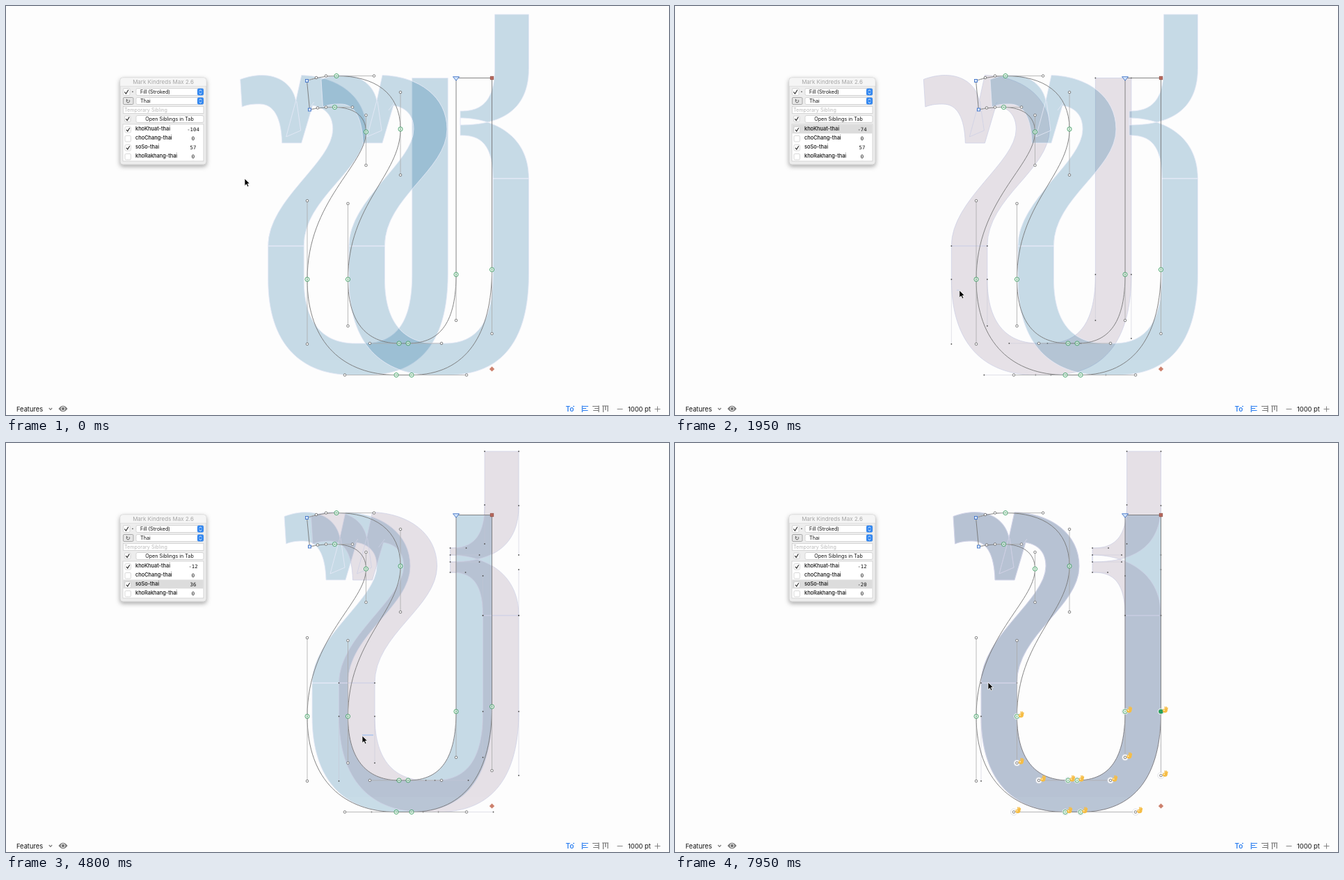
Recreate the animation shown at these times as an HTML page. Size 953 by 588 pixels, loop 8000 ms.

```html
<!DOCTYPE html>
<html lang="en">
<head>
<meta charset="utf-8">
<title>Glyph siblings</title>
<style>
  html, body { margin: 0; width: 100%; height: 100%; overflow: hidden; background: #fdfdfd; }
  svg { display: block; width: 100%; height: 100%; }
  text { font-family: Inter, Roboto, sans-serif; fill: #111; }
  #panel text { font-size: 7.2px; }
  #panel .name { font-size: 7.4px; font-weight: 500; }
  #panel .value { font: 500 7.3px "DejaVu Sans Mono", "Noto Sans Mono", monospace; text-anchor: middle; }
  #panel .dim { fill: #b9b9b9; }
  .box { fill: #fff; stroke: #c9c9c9; stroke-width: .7; }
  .tick { fill: none; stroke: #222; stroke-width: 1.1; }
  .sibling .fill { fill: rgb(10,100,150); opacity: .22; }
  .sibling .edge { fill: none; stroke: rgba(232,234,248,.8); stroke-width: 1; }
  .sibling .points { display: none; }
  .sibling.on .fill { fill: rgb(100,67,107); opacity: .15; }
  .sibling.on .edge { stroke: rgba(205,207,229,.75); }
  .sibling.on .points { display: inline; }
  .points circle { fill: #555; }
  .points line { stroke: #c5c5d5; stroke-width: .5; }
  #outline { fill: none; stroke: #777; stroke-width: .9; }
  .arm { stroke: #aaa; stroke-width: .8; }
  .handle { fill: #fdfdfd; stroke: #666; stroke-width: .8; }
  .smooth { fill: rgba(230,250,235,.6); stroke: #45a068; stroke-width: .9; }
  .smooth.on { fill: #1fa05a; }
  .corner { fill: #d5e5fa; stroke: #3f72c8; stroke-width: .9; }
  .halo { fill: #fff; stroke: #c4cad2; stroke-width: .6; opacity: .85; }
  #marquee { fill: rgba(0,120,255,.22); }
  .icon { fill: none; stroke: #777; stroke-width: 1.2; }
</style>
</head>
<body>
<svg viewBox="0 0 953 588" preserveAspectRatio="none">
  <defs>
    <filter id="shadow" x="-20%" y="-20%" width="140%" height="150%">
      <feDropShadow dx="0" dy="2.5" stdDeviation="3" flood-opacity=".35"/>
    </filter>
    <g id="stepper">
      <rect width="9" height="10" rx="2" fill="#3488f0"/>
      <path d="M2.7 4L4.5 2.2L6.3 4M2.7 6.2L4.5 8L6.3 6.2" fill="none" stroke="#fff" stroke-width=".9"/>
    </g>
    <g id="hand">
      <ellipse cx="5.8" cy="-1.2" rx="3.5" ry="2.9" fill="#f6bd45"/>
      <path d="M6.3 -2.5L5.8 -6.6M7.6 -2.5L7.9 -6.4M8.6 -1.6L9.4 -5" stroke="#f6bd45" stroke-width="1.5" stroke-linecap="round"/>
      <circle cx="4.6" cy="-1.8" r=".9" fill="#fff1cf"/>
    </g>
  </defs>
  <g id="siblings"></g>
  <path id="outline"/>
  <g id="editor"></g>
  <path d="M698.5 518.2L702.2 521.9L698.5 525.6L694.8 521.9Z" fill="#cc806c"/>
  <rect id="marquee"/>

  <g id="panel">
    <rect x="164" y="103" width="124" height="125" rx="4" fill="#ededed" stroke="#bbb" stroke-width=".6" filter="url(#shadow)"/>
    <path d="M164.3 115V107Q164.3 103.3 168 103.3H284Q287.7 103.3 287.7 107V115Z" fill="#f5f5f5"/>
    <path d="M164 115.3H288" stroke="#d5d5d5" stroke-width=".6"/>
    <text x="226" y="112.3" text-anchor="middle" style="font-size:8px;fill:#a5a5a5">Mark Kindreds Max 2.6</text>
    <rect class="box" x="168.5" y="118.5" width="9.5" height="10" rx="1.5"/>
    <path class="tick" d="M170.3 123.5L172.5 126L176 120.5"/>
    <circle cx="182" cy="123.3" r=".8" fill="#333"/>
    <rect class="box" x="187" y="118.5" width="97" height="10" rx="2"/>
    <text x="193" y="126">Fill (Stroked)</text>
    <use href="#stepper" x="275" y="118.5"/>
    <rect x="168.5" y="131.5" width="14.5" height="10" rx="1.5" fill="#e5e5e5" stroke="#999" stroke-width=".8"/>
    <path d="M174 135A2.2 2.2 0 1 0 177 135M173.5 133.8V135.5H175.3" fill="none" stroke="#444" stroke-width=".8"/>
    <rect class="box" x="187" y="131.5" width="97" height="10" rx="2"/>
    <text x="193" y="139">Thai</text>
    <use href="#stepper" x="275" y="131.5"/>
    <rect class="box" x="168.5" y="144.5" width="115.5" height="10"/>
    <text class="dim" x="170" y="152">Temporary Sibling</text>
    <rect class="box" x="170.5" y="158" width="8.5" height="8.5" rx="1.5"/>
    <path class="tick" d="M172.3 162.2L174.2 164.5L177.3 159.5"/>
    <rect class="box" x="187" y="157.5" width="97" height="10" rx="2"/>
    <text x="235" y="165" text-anchor="middle">Open Siblings in Tab</text>
    <rect class="box" x="168" y="170" width="116" height="53"/>
    <g id="rows"></g>
  </g>

  <text x="15" y="583" style="font-size:9.3px">Features</text>
  <path class="icon" d="M61.8 578L64 580.3L66.2 578"/>
  <path d="M75.5 579Q82 570.5 88.5 579Q82 587.5 75.5 579Z" fill="#777"/>
  <circle cx="82" cy="579" r="2.8" fill="#777" stroke="#fdfdfd"/>
  <text x="804.5" y="583" style="font-size:10px;font-weight:600;fill:#2d7ff0">To</text>
  <path d="M815 575.5H817" stroke="#2d7ff0"/>
  <path class="icon" style="stroke:#2d7ff0" d="M828.3 574.5V584M829 575.5H837M829 578.5H834M829 581.5H836.5"/>
  <path class="icon" d="M852 574.5V584M843 575.5H852M846 578.5H852M844 581.5H852"/>
  <path class="icon" d="M857 575H866M858.5 575V584M861.7 575V581M865 575V583"/>
  <path class="icon" style="stroke-width:.9" d="M878.5 579.5H886.5M932.5 579.5H940.5M936.5 575.5V583.5"/>
  <text x="894" y="583" style="font-size:9.3px">1000 pt</text>
  <path id="cursor" d="M0 0V10.6L2.5 8.3L4.2 12L6 11.2L4.4 7.6H7.6Z" fill="#000" stroke="#fff" stroke-width=".8"/>
</svg>
<script>
const $ = id => document.getElementById(id);
const LOOP = 8000, STEP = 50, UNIT = 0.688;

function add(parent, tag, attrs, text) {
  const node = document.createElementNS('http://www.w3.org/2000/svg', tag);
  for (const key in attrs) node.setAttribute(key, attrs[key]);
  if (text !== undefined) node.textContent = text;
  return parent.appendChild(node);
}

// Shapes use only absolute M, L, C and Z.
const head = 'M400 105.5C412 101 423 99.5 431 99.5C455 99.5 475 112 480 136L488 99.5' +
  'C540 101 581 130 581 177C581 236 491.5 275 491.5 345L440 345C440 278 533 225 533 177' +
  'C533 157 522 146 504 143L488 197L460 197C459 160 448 141 428 141C421 141 412 141 402.5 145Z';
const fold = 'M480 136L466 188L487 179L481 137M497 150L506 138';
const body = top => `M440 345L440 393C440 486 487 530.5 561 530.5L583 530.5C662 530.5 698.5 478 698.5 386` +
  `L698.5 ${top}L647 ${top}L647 386C647 452 626 485 578 485L565 485C523 485 491.5 460 491.5 393L491.5 345Z`;
const tail = 'M698.5 12L649.5 12L649.5 89C649.5 145 623 151 600 151L600 171C642 171 698.5 161 698.5 90Z' +
  'M600 161C642 161 698.5 182 698.5 248L647 248C647 191 622 186 600 186Z';
const edited = drop => `M647 103.5L647 386C647 452 626 485 578 485L565 485C523 485 491.5 460 491.5 393` +
  `C491.5 284 567 243 567 177C567 124 529 100.5 475 100.5C460 100.5 446 103 432.5 107.5L436.5 149` +
  `C448 146.5 460 145.5 472.5 145.5C498 145.5 517.5 157 517.5 181C517.5 229 433 280 433 393` +
  `C433 486 487 530.5 561 530.5L583 530.5C662 530.5 698.5 ${471 + drop} 698.5 ${379 + drop}L698.5 103.5Z`;

function parse(path) {
  const nodes = [], handles = [], arms = [];
  let last;
  for (const [, cmd, args] of path.matchAll(/([MLC])([^MLCZ]+)/g)) {
    const n = args.trim().split(/\s+/).map(Number), pts = [];
    for (let i = 0; i < n.length; i += 2) pts.push([n[i], n[i + 1]]);
    const end = pts[pts.length - 1];
    if (cmd === 'C') {
      handles.push(pts[0], pts[1]);
      arms.push([last, pts[0]], [pts[1], end]);
    }
    nodes.push(end);
    last = end;
  }
  return { nodes, handles, arms };
}
const line = (parent, [[x1, y1], [x2, y2]], cls = '') => add(parent, 'line', { x1, y1, x2, y2, class: cls });
const dot = (parent, [cx, cy], r, cls = '') => add(parent, 'circle', { cx, cy, r, class: cls });

function makeSibling(home, parts, lower) {
  const group = add($('siblings'), 'g', { class: 'sibling' });
  const fill = add(group, 'g', { class: 'fill' });
  parts.forEach(d => add(fill, 'path', { d }));
  [...parts, fold].forEach(d => add(group, 'path', { d, class: 'edge' }));
  const points = add(group, 'g', { class: 'points' });
  const shape = parse(lower);
  shape.arms.forEach(arm => line(points, arm));
  const spots = [...shape.nodes, ...shape.handles];
  spots.forEach(p => dot(points, p, 0.9));
  return { group, home, spots };
}
const khuat = makeSibling(-12, [head, body(103.5)], body(103.5));
const soSo = makeSibling(-20, [head, body(248), tail], body(248) + tail);

const rows = ['khoKhuat-thai', 'choChang-thai', 'soSo-thai', 'khoRakhang-thai'].map((name, i) => {
  const y = 170.5 + 13 * i, g = $('rows');
  const back = add(g, 'rect', { x: 168.4, y, width: 115.2, height: 12.8, fill: '#dcdcdc' });
  add(g, 'rect', { class: 'box', x: 171, y: y + 3, width: 8.5, height: 8.5, rx: 1.5 });
  if (i % 2 === 0) add(g, 'path', { class: 'tick', d: `M173 ${y + 7.3}L174.8 ${y + 9.5}L177.8 ${y + 4.7}` });
  add(g, 'text', { class: 'name', x: 186, y: y + 8.7 }, name);
  return { back, value: add(g, 'text', { class: 'value', x: 269, y: y + 9.2 }, '0') };
});

// Each key is [time, ...values]; moves ease between keys.
const cursorKeys = [[0, 343, 248], [420, 212, 178], [560, 212, 178], [1100, 415, 412], [1150, 415, 412],
  [1500, 441, 411], [1580, 441, 411], [1850, 405, 408], [2550, 473, 419.5], [3000, 472, 419.5],
  [3800, 220, 205], [4100, 220, 205], [4500, 528, 419], [5250, 482.5, 424], [6150, 471, 425.5],
  [6400, 471, 425.5], [7000, 694, 380], [7480, 696, 382], [7950, 450, 344]];
const khuatKeys = [[1150, -104], [1500, -78], [1850, -78], [2550, -11], [2750, -11], [2800, -12]];
const soSoKeys = [[4500, 57], [5250, -3], [6150, -20]];
const dropKeys = [[7150, 0], [7450, 7]];
const drags = [[1150, 1500, 415, 412], [1850, 2800, 405, 408], [4500, 6400, 528, 419]];

function track(keys, t) {
  const i = keys.findIndex(k => k[0] > t);
  if (i === 0) return keys[0].slice(1);
  if (i < 0) return keys[keys.length - 1].slice(1);
  const a = keys[i - 1], b = keys[i], u = (t - a[0]) / (b[0] - a[0]);
  const e = u * u * (3 - 2 * u);
  return a.slice(1).map((v, j) => v + (b[j + 1] - v) * e);
}

function drawEditor(drop, sibling, shift, picked) {
  const d = edited(drop), shape = parse(d), g = $('editor');
  $('outline').setAttribute('d', d);
  g.replaceChildren();
  const matches = ([x, y]) => sibling &&
    sibling.spots.some(([sx, sy]) => Math.hypot(sx + shift - x, sy - y) < 0.4);
  const hits = [...shape.nodes, ...shape.handles].filter(matches);
  shape.arms.forEach(arm => line(g, arm, 'arm'));
  hits.forEach(p => dot(g, p, 4.6, 'halo'));
  shape.handles.forEach(p => dot(g, p, 1.8, 'handle'));
  shape.nodes.forEach(p => {
    const [x, y] = p;
    if (y === 103.5 && x < 650) {
      add(g, 'path', { d: 'M642.5 101.7L651.5 101.7L647 107.2Z', class: 'corner' });
    } else if (y === 103.5) {
      add(g, 'rect', { x: x - 2.3, y: y - 2.3, width: 4.6, height: 4.6, fill: '#b9685c', stroke: '#8d4941', 'stroke-width': .7 });
    } else if (x < 437 && y < 150) {
      add(g, 'rect', { x: x - 2, y: y - 2, width: 4, height: 4, class: 'corner' });
    } else {
      const on = picked && x === 698.5;
      dot(g, p, 3.1, on ? 'smooth on' : 'smooth');
      add(g, 'circle', { cx: x, cy: y, r: .8, fill: '#45a068' });
    }
  });
  hits.forEach(([x, y]) => add(g, 'use', { href: '#hand', x, y }));
}

let state = '';
function render(t) {
  const selected = t < 500 ? null : t < 4050 ? khuat : soSo;
  const values = new Map([[khuat, Math.round(track(khuatKeys, t)[0])], [soSo, Math.round(track(soSoKeys, t)[0])]]);
  const shiftOf = s => (values.get(s) - s.home) * UNIT;
  [khuat, soSo].forEach((s, i) => {
    s.group.setAttribute('transform', `translate(${shiftOf(s)} 0)`);
    s.group.classList.toggle('on', s === selected);
    rows[2 * i].value.textContent = values.get(s);
  });
  rows.forEach((row, i) => {
    const on = (i === 0 && selected === khuat) || (i === 2 && selected === soSo);
    row.back.style.display = on ? '' : 'none';
  });

  const drop = Math.round(track(dropKeys, t)[0]), picked = t >= 7100;
  const next = [drop, picked, selected === soSo, !selected, ...values.values()].join();
  if (next !== state) drawEditor(drop, selected, selected ? shiftOf(selected) : 0, picked);
  state = next;

  const [x, y] = track(cursorKeys, t);
  $('cursor').setAttribute('transform', `translate(${x} ${y})`);
  const drag = drags.find(([from, to]) => t >= from && t < to);
  const [, , x0, y0] = drag || [0, 0, x, y];
  const frame = { x: Math.min(x, x0), y: Math.min(y, y0), width: Math.abs(x - x0), height: Math.abs(y - y0) };
  for (const key in frame) $('marquee').setAttribute(key, frame[key]);
}

const start = performance.now();
function tick() {
  const t = (performance.now() - start) % LOOP;
  render(Math.floor(t / STEP) * STEP);
  requestAnimationFrame(tick);
}
tick();
</script>
</body>
</html>
```
